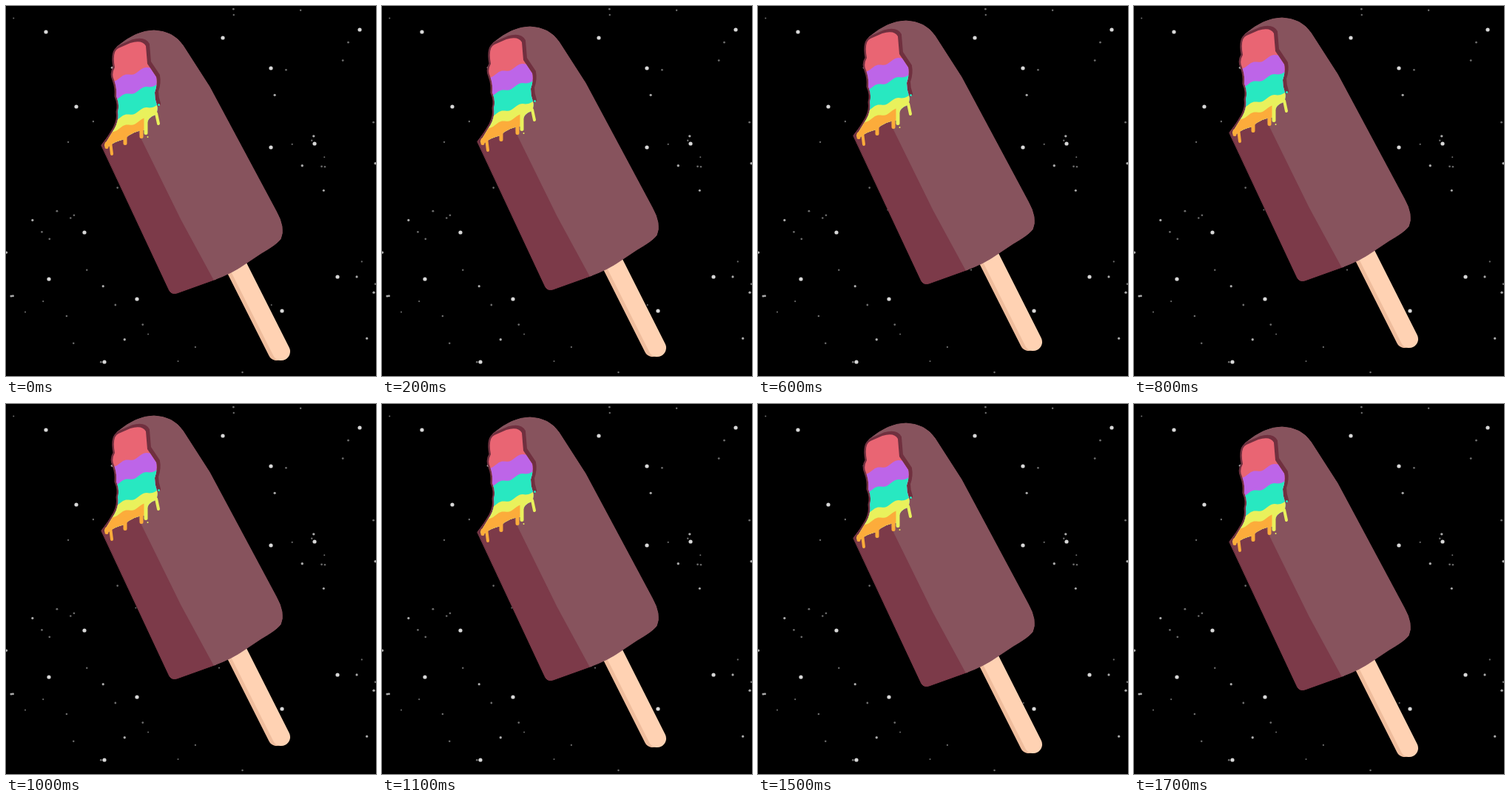
Write an HTML page that moves like this. It is 500 px wide and 500 px high and loops after 1800 ms.

```html
<!DOCTYPE html>
<html lang="en">
<head>
<meta charset="utf-8">
<title>Floating ice pop</title>
<style>
  html, body { margin: 0; width: 100%; height: 100%; overflow: hidden; background: #000; }
  svg { display: block; width: 100vw; height: 100vh; }
</style>
</head>
<body>
<svg viewBox="0 0 500 500">
  <g id="stars"></g>
  <g id="pop" stroke-linejoin="round" stroke-linecap="round">
    <g id="stick" stroke-width="24">
      <path stroke="#efbd9d" d="M307 350L366 467"/>
      <path stroke="#ffd2b3" d="M313 350L372 467"/>
    </g>
    <path fill="#7c3a49" stroke="#7c3a49" d="M129 188L150 160H190L284 369L231 388Q224 390 221 385Z"/>
    <path fill="#87535d" stroke="#87535d" d="M150 55Q176 33 200 33Q226 34 239 53L275 109L365 277Q378 300 371 315Q366 322 345 334L324 348Q306 361 281 370L237 289L181 175Z"/>
    <g id="bite" fill="none"></g>
  </g>
</svg>
<script>
  const $ = id => document.getElementById(id);
  const path = (d, attrs) => `<path d="${d}" ${attrs}/>`;

  // Stars: the brightest are placed, the faint ones scattered
  let seed = 11;
  const random = () => (seed = seed * 16807 % 2147483647) / 2147483647;
  const star = (x, y, r, color) => `<circle cx="${x}" cy="${y}" r="${r}" fill="${color}"/>`;
  const bright = [[54, 35], [95, 136], [106, 306], [58, 369], [177, 396], [133, 481], [293, 43],
    [478, 32], [358, 84], [417, 186], [358, 191], [448, 366], [373, 412]];
  let sky = bright.map(([x, y]) => star(x, y, 2.6, '#d8d8d8')).join('');
  for (let i = 0; i < 70; i++) {
    const size = random();
    sky += star(500 * random(), 500 * random(), 1 + 0.7 * size, size > 0.7 ? '#aaa' : '#6c6c6c');
  }
  $('stars').innerHTML = sky;

  // Bite: a dark rim around wavy colour bands, with drips below
  const rim = 'M133 188L147 165Q153 153 151 143Q154 133 149 122Q150 110 146 100Q142 92 147 83' +
    'Q143 61 152 57L168 50Q184 45 189 54L191 78L203 96Q205 106 201 117Q201 126 204 134';
  const biteShape = rim + 'Q206 142 202 147Q192 150 190 160V167Q170 169 160 180Q147 183 140 189Q134 192 133 188Z';
  const rimStroke = 'stroke="#70303f" stroke-width="5"';
  const [RED, PURPLE, TEAL, YELLOW, ORANGE] = ['#e96573', '#bd65e8', '#28e8c1', '#e9f15c', '#fcac3b'];

  function band(top, color, right = 210) {
    let d = 'M130 210';
    for (let x = 130; x <= right; x += 2) {
      const y = top - 0.36 * (x - 146) - 1.8 * Math.cos((x - 160) / 26 * 2 * Math.PI);
      d += `L${x} ${y.toFixed(1)}`;
    }
    return path(d + `V210Z`, `fill="${color}"`);
  }
  const drip = (x, top, bottom, width, color, lean = 0) =>
    path(`M${x} ${top}L${x + lean} ${bottom - width / 2}`, `stroke="${color}" stroke-width="${width}"`);

  $('bite').innerHTML =
    path(rim, rimStroke) + path(rim, rimStroke + ' transform="translate(2.5 -2)"') +
    `<clipPath id="inside">${path(biteShape, '')}</clipPath><g clip-path="url(#inside)">` +
    band(0, RED) + band(100, PURPLE) + band(126, TEAL) + band(154, YELLOW) + band(168, ORANGE, 188) + '</g>' +
    drip(189, 152, 174, 5, YELLOW) + drip(203, 145, 161, 4, YELLOW, 3) +
    drip(136, 186, 193, 5, ORANGE) + drip(141, 184, 202, 4, ORANGE, 2) +
    drip(161, 172, 188, 5, ORANGE) + drip(183, 162, 179, 5, ORANGE) +
    star(206.5, 133.5, 1.5, TEAL) + star(191.5, 177, 1, YELLOW);

  // The pop rises and sinks in whole pixels, ten times a second
  const STEP = 100, STEPS = 18;
  const start = performance.now();

  function draw(now) {
    const step = Math.floor(Math.max(0, now - start) / STEP) % STEPS;
    const k = Math.min(step, STEPS - step);
    const rise = Math.round(2.4 * k - 0.04 * k * k);
    $('pop').setAttribute('transform', `translate(0 ${-rise})`);
    requestAnimationFrame(draw);
  }
  draw(start);
</script>
</body>
</html>
```
